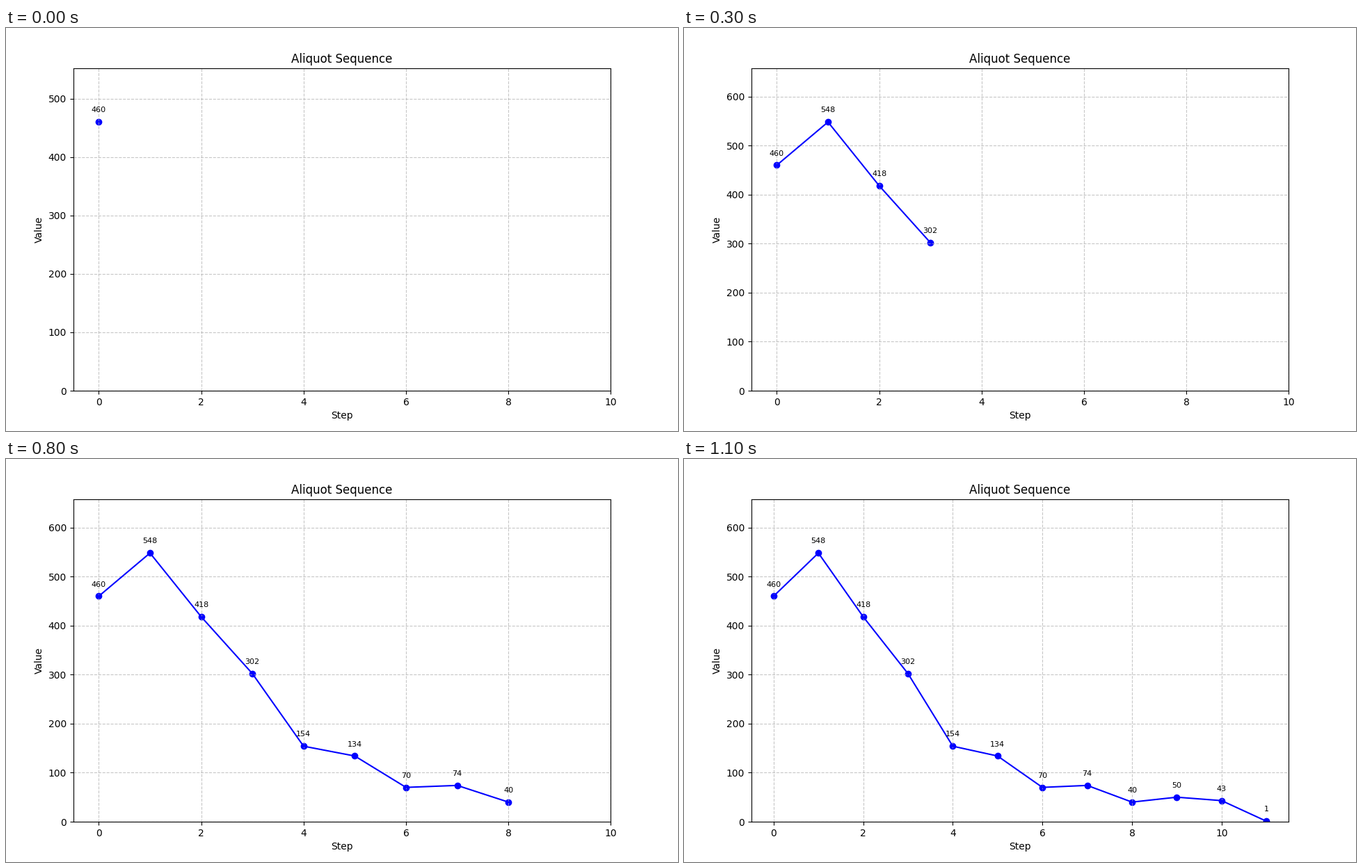
Write a matplotlib script that moves like this. It is 966x580 px and loops after 1.2 s.

```python
import matplotlib.pyplot as plt
from matplotlib.animation import FuncAnimation

DPI = 100
START = 460


def aliquot(n):
    """Sum of the proper divisors of n."""
    return sum(d for d in range(1, n // 2 + 1) if n % d == 0)


def sequence(n):
    values = [n]
    while values[-1] > 1:
        values.append(aliquot(values[-1]))
    return values


values = sequence(START)

fig, ax = plt.subplots(figsize=(966 / DPI, 580 / DPI), dpi=DPI)
fig.subplots_adjust(left=0.1, right=0.9, bottom=0.1, top=0.9)


def update(step):
    ax.clear()
    shown = values[:step + 1]
    steps = range(len(shown))

    # Scatter sits below the grid, the connecting line above it.
    ax.scatter(steps, shown, color="blue")
    ax.plot(steps, shown, color="blue")
    for x, y in zip(steps, shown):
        ax.annotate(str(y), (x, y), xytext=(0, 10),
                    textcoords="offset points", ha="center", fontsize=8)

    ax.set_xlim(-0.5, max(10, step + 0.5))
    ax.set_ylim(0, max(shown) * 1.2)
    ax.set_title("Aliquot Sequence")
    ax.set_xlabel("Step")
    ax.set_ylabel("Value")
    ax.grid(True, linestyle="--", alpha=0.7)
    return []


anim = FuncAnimation(fig, update, frames=len(values), init_func=lambda: [],
                     interval=100, repeat=True, repeat_delay=0)
plt.show()
```
